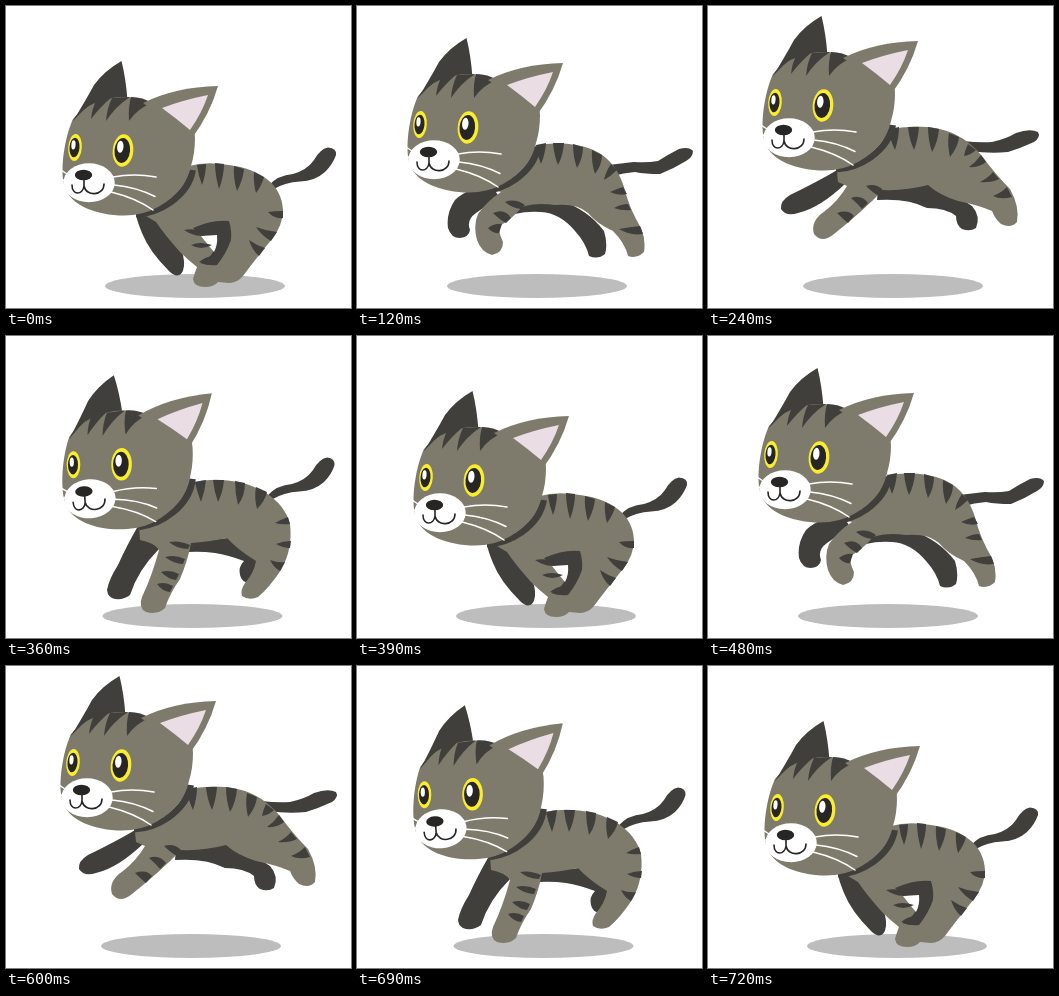
Recreate the animation shown at these times as an HTML page. Size 345 px wide and 302 px high, loop 750 ms.

```html
<!DOCTYPE html>
<html lang="en">
<head>
<meta charset="utf-8">
<title>Running cat</title>
<style>
  html, body { margin: 0; width: 100%; height: 100%; overflow: hidden; background: #fff; }
  svg { display: block; width: 100%; height: 100%; }
  .fur { fill: #7f7b6c; }
  .dark { fill: #403f3b; }
  .white { fill: #fff; }
  .yellow { fill: #f9ed2c; }
  .black { fill: #282625; }
  .line { fill: none; stroke-linecap: round; }
</style>
</head>
<body>
<svg id="stage" viewBox="0 0 345 302">
  <defs>
    <g id="head">
      <path fill="none" stroke="#403f3b" stroke-width="7" d="M130 208C152 207 182 191 186.500 164"/>
      <path class="dark" d="M67 115C75 102 82 90 88 79Q98 65 115.500 55Q120 73 121.500 95Z"/>
      <path class="fur" d="M67 113C80 98 100 90 122 91Q135 92 146 97C176 104 189 115 189 132Q189 147 185 160C180 182 166 193 152 201Q137 209.500 118 209.500C90 209.500 65 199 59 182C53 165 59 130 67 113Z"/>
      <path class="dark" d="M66 116Q73 103 88 95Q77 104 66 116ZM90 95L106 91Q95 100 85 113Q86 103 90 95ZM106 92L124 91Q110 100 100 115Q101 102 106 92ZM125 91Q137 91 146 97Q132 102 123 115Q122 101 125 91Z"/>
      <path class="fur" d="M137 97Q169 81 212 80Q204 108 186 132Z"/>
      <path fill="#eaDDe4" d="M156 102Q177 94 202 89Q196 107 184 124Q171 113 156 102Z"/>
      <g id="left-eye" transform="rotate(4 69 141.500)">
        <ellipse class="yellow" cx="69" cy="141.500" rx="6.800" ry="13.500"/>
        <ellipse class="black" cx="68.500" cy="141.500" rx="5" ry="9.800"/>
        <ellipse class="white" cx="67.300" cy="139" rx="2.100" ry="4.600"/>
      </g>
      <g id="right-eye" transform="rotate(5 117 144.500)">
        <ellipse class="yellow" cx="117" cy="144.500" rx="10.300" ry="16.200"/>
        <ellipse class="black" cx="116.300" cy="144.500" rx="7.800" ry="12.500"/>
        <ellipse class="white" cx="114" cy="141" rx="3.200" ry="6"/>
      </g>
      <ellipse class="white" cx="83" cy="176.700" rx="25.700" ry="19.500"/>
      <ellipse class="black" cx="77.500" cy="169" rx="8.700" ry="5.200"/>
      <path class="line" stroke="#282625" stroke-width="1.600" d="M78 173V180C77 189 66 190 66 179M78 180C80 191 98 190 98 178"/>
      <path class="line" stroke="#fff" stroke-width="1.500" d="M107 171Q128 167 150 171M108 179Q130 181 149 190.500M105 186Q130 192 147 204M55 164L61 168M56 174L61 175M58 183L62 181"/>
    </g>
  </defs>
</svg>
<script>
const LOOP = 750;

// head: translation and turn; shadow: centre x; far: legs on the other side
const poses = {
  crouch: {
    head: [0, 0, 0], shadow: 189,
    tail: 'M262 180Q272 169 287 168Q301 164 308 154Q314 143 322 141.500Q331 142 330 149Q327 158 319 166Q309 175 294 175.500Q279 176 266 184Z',
    far: 'M129 205L155 208Q166 228 177 249Q180 262 175 268Q170 272 163 265Q143 245 136 227Q131 215 129 205Z',
    body: 'M183 160Q200 155 223 159C255 163 276 179 277 204Q277 219 266 233Q248 255 237 270Q231 277 223 277L212 276Q208 281 199 281Q188 281 187 273Q189 266 191 261Q182 254 174 246Q158 228 150 216L135 207Z',
    inner: 'M187 222Q207 213 223 215Q226 225 225 234Q220 248 211 259Q202 260 194 257Q204 252 207 246L211 231L195 230Z',
    hole: 'M195 230L211 229Q212 239 208 246Q202 239 195 230Z',
    stripes: 'M191 159L200 158Q200 168 196 179Q192 169 191 159ZM209 157L218 158Q218 170 213 183Q209 169 209 157ZM228 160L238 163Q237 174 231 185Q227 172 228 160ZM248 166L258 171Q256 179 250 187Q247 176 248 166ZM277 205L277 212Q268 213 262 206Q268 205 277 205ZM271 226L265 235Q256 230 250 221Q260 225 271 226ZM259 242L253 250Q246 244 243 234Q250 239 259 242ZM178 224Q190 221 200 229Q190 232 178 224ZM185 239Q194 235 206 239Q195 245 185 239ZM193 256Q201 249 211 250L207 258Z'
  },
  rise: {
    head: [-6, -23, 0], shadow: 180,
    tail: 'M252 159Q268 157 277 156Q290 157 301 155Q312 148 322 143Q332 140 336 145Q336 151 329 155Q316 163 303 168Q288 168 278 166Q266 167 256 170Z',
    far: 'M136 181Q111 181 98 194Q89 207 91 222Q94 232 103 232Q112 231 113 224Q109 214 119 207L142 191ZM160 198L205 195Q231 204 247 225Q251 238 248 248Q241 254 232 250Q229 237 218 225Q203 207 184 206Q170 205 158 208Z',
    body: 'M177 140Q199 135 219 139C245 143 260 158 267 181Q272 202 284 222Q289 234 287 246Q280 253 271 250Q268 237 256 225Q240 218 231 207Q220 197 198 199Q179 196 165 201Q155 213 144 219Q140 224 146 236Q146 247 135 249Q124 246 120 234Q116 219 121 208Q130 195 144 186L130 181Z',
    stripes: 'M179 139L189 137Q188 149 184 158Q180 149 179 139ZM196 137L207 137Q206 150 201 159Q197 149 196 137ZM216 138L226 141Q226 152 220 162Q216 151 216 138ZM235 144L245 149Q245 159 238 168Q234 156 235 144ZM254 158L260 164Q254 170 247 174Q249 165 254 158ZM266 181L270 188Q261 190 253 186Q259 183 266 181ZM271 198L274 204Q265 205 257 202Q264 198 271 198ZM283 220L286 228Q273 230 262 223Q273 221 283 220ZM148 196Q158 192 168 199L164 203Q155 202 148 196ZM136 207Q148 202 154 212L149 217Q143 214 136 207ZM131 222Q138 217 145 218L142 227Q136 228 131 222Z'
  },
  leap: {
    head: [-2, -45, 0], shadow: 185,
    tail: 'M255 135Q272 137 284 136Q298 133 308 127Q322 122 330 126Q333 131 326 136Q313 142 300 146Q282 148 262 145Z',
    far: 'M131 163Q109 176 82 189Q72 195 73 203Q78 211 90 207Q112 202 138 177ZM170 183L222 177Q242 185 264 200Q273 210 268 222Q262 226 254 223Q248 219 248 210Q238 202 219 202Q200 192 169 194Z',
    body: 'M179 124Q199 119 219 121C244 123 262 135 274 150Q288 169 302 183Q312 201 309 216Q303 223 293 218Q287 213 284 205Q270 199 250 195Q231 189 220 179Q197 185 175 184Q155 205 126 228Q114 238 106 228Q102 215 117 205Q130 195 139 180L130 176L129 166Q157 157 170 145Z',
    stripes: 'M181 123L191 121Q191 132 187 144Q182 134 181 123ZM200 121L211 121Q210 134 206 144Q201 133 200 121ZM220 121L231 123Q230 136 224 146Q220 134 220 121ZM241 127L251 131Q250 141 242 151Q239 138 241 127ZM260 138L268 144Q263 149 256 150Q257 144 260 138ZM273 149L278 156Q271 162 261 161Q268 156 273 149ZM285 166L291 173Q283 177 272 176Q280 172 285 166ZM299 181L304 191Q293 194 285 190Q293 187 299 181ZM158 180Q168 177 175 184L171 190Q165 187 158 180ZM143 192Q153 188 160 197L154 203Q150 198 143 192ZM129 207Q140 203 146 210L140 217Q135 213 129 207Z'
  },
  land: {
    head: [-1.5, -14.5, -4], shadow: 186.500,
    tail: 'M261 160Q271 149 286 148Q300 144 307 134Q313 123 321 121.500Q329 122 328.500 129Q326 138 318 146Q308 155 293 155.500Q278 156 265 164Z',
    far: 'M132 190Q120 211 112 229Q103 243 101 254Q102 262 109 263Q118 264 124 259Q132 234 153 213ZM183 206L222 202Q242 212 253 224L246 246Q236 248 234 239Q232 231 238 225Q222 219 209 217Q195 215 181 216Z',
    body: 'M183 147Q203 142 222 144.500C250 147 278 163 284 188Q287 213 275 234Q263 252 252 261Q243 265 236 260Q234 254 239 247Q248 237 250 225Q232 214 221 202Q202 206 185 207Q182 224 174 243Q164 257 159 272Q152 279 140 276Q132 272 136 261Q146 240 153 214Q149 207 134 204L133 190Z',
    stripes: 'M189 146L200 144Q199 155 195 166Q191 156 189 146ZM207 144L218 144Q217 156 212 166Q208 155 207 144ZM229 145L239 147Q239 160 232 169Q229 157 229 145ZM250 151L261 156Q259 165 251 173Q248 161 250 151ZM282 181L284 188Q276 189 269 187Q276 183 282 181ZM285 205L284 212Q277 212 270 208Q277 205 285 205ZM279 226L274 235Q268 232 264 224Q272 227 279 226ZM163 206Q173 204 184 209L182 213Q171 213 163 206ZM159 221Q169 218 179 223L177 228Q168 228 159 221ZM155 236Q164 233 173 238L170 244Q162 243 155 236ZM151 248Q159 245 167 250L164 256Q156 255 151 248Z'
  }
};

// [start in ms, pose]
const steps = [
  [0, 'crouch'], [120, 'rise'], [240, 'leap'], [360, 'land'],
  [390, 'crouch'], [480, 'rise'], [600, 'leap'], [690, 'land'], [720, 'crouch']
];

const stage = document.getElementById('stage');

function add(parent, tag, attributes) {
  const node = document.createElementNS('http://www.w3.org/2000/svg', tag);
  for (const [key, value] of Object.entries(attributes)) node.setAttribute(key, value);
  return parent.appendChild(node);
}

function drawPose(pose) {
  const group = add(stage, 'g', { opacity: 0 });
  const shape = (kind, d) => d && add(group, 'path', { class: kind, d });
  add(group, 'ellipse', { cx: pose.shadow, cy: 280, rx: 90, ry: 12, fill: '#bdbdbd' });
  shape('dark', pose.tail);
  shape('dark', pose.far);
  shape('fur', pose.body);
  shape('dark', pose.inner);
  shape('white', pose.hole);
  shape('dark', pose.stripes);
  const [x, y, turn] = pose.head;
  add(group, 'use', { href: '#head', transform: `translate(${x} ${y}) rotate(${turn} 93 142.5)` });
  return group;
}

for (const [name, pose] of Object.entries(poses)) {
  const frames = steps.map(([start, shown]) => ({
    offset: start / LOOP, opacity: shown === name ? 1 : 0, easing: 'step-end'
  }));
  frames.push({ offset: 1, opacity: name === 'crouch' ? 1 : 0 });
  drawPose(pose).animate(frames, { duration: LOOP, iterations: Infinity });
}
</script>
</body>
</html>
```
